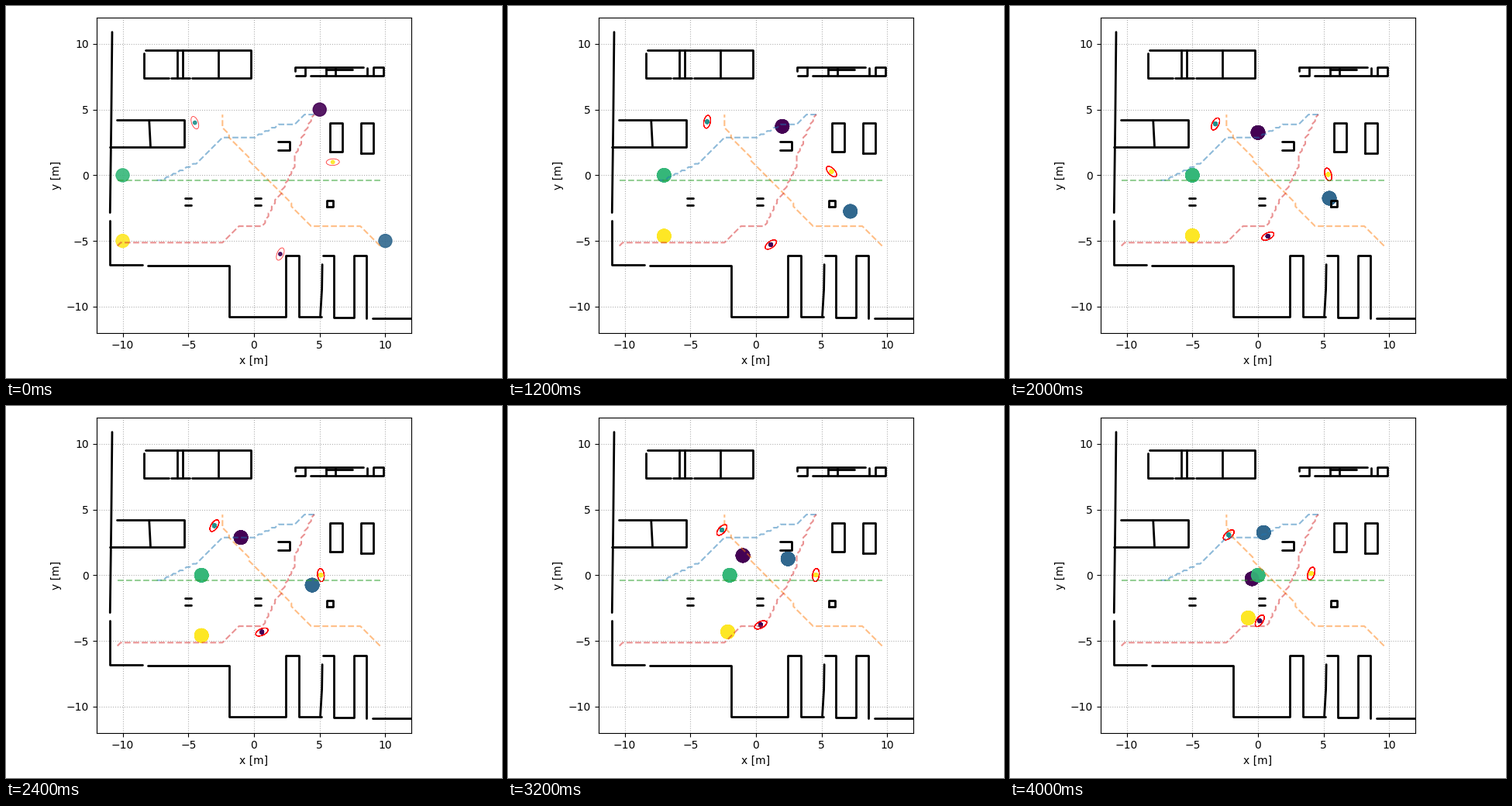
Animation of 640x480 px, one loop 4200 ms. Source, as a matplotlib script:

```python
import matplotlib.pyplot as plt
import numpy as np
from matplotlib.animation import FuncAnimation
from matplotlib.patches import Ellipse

FRAMES = 21
INTERVAL = 200
CELL = 0.25                       # planner grid, metres
ORIGIN = np.array([-10.4, -5.38])

# Routes as corner cells of the planner grid
ROUTES = {
    "tab:blue": [(60, 40), (57, 40), (54, 37), (49, 37), (42, 33), (32, 33),
                 (24, 25), (13, 20), (12, 20)],
    "tab:orange": [(80, 0), (74, 6), (59, 6), (34, 33), (32, 37), (32, 40)],
    "tab:green": [(0, 20), (80, 20)],
    "tab:red": [(0, 0), (1, 1), (32, 1), (37, 6), (44, 6), (54, 24), (54, 27),
                (58, 37), (60, 40)],
}

# Robots turn at (step, x, y) and drive straight in between
ROBOTS = [
    [(0, 5, 5), (3, 3.5, 4.08), (10, 0, 3.25), (14, -2, 2.5), (16, -1, 1.5),
     (20, -0.45, -0.27)],
    [(0, 10, -5), (3, 8.5, -3.5), (10, 5.43, -1.75), (20, 0.43, 3.25)],
    [(0, -10, 0), (20, 0, 0)],
    [(0, -10, -5), (3, -8.5, -4.65), (15, -2.5, -4.57), (20, -0.75, -3.25)],
]

# People follow smooth cubics through their positions at these steps
PEOPLE_STEPS = [0, 6, 14, 20]
PEOPLE = [
    [(2, -6), (1.13, -5.28), (0.47, -4.03), (0.13, -3.47)],
    [(-4.5, 4), (-3.72, 4.07), (-2.8, 3.62), (-2.23, 3.07)],
    [(6, 1), (5.75, 0.28), (4.83, 0), (4.05, 0.13)],
]
CURVES = [np.polyfit(PEOPLE_STEPS, points, 3).T for points in PEOPLE]

fig, ax = plt.subplots(figsize=(6.4, 4.8), dpi=100)


def draw(points):
    ax.plot(*np.transpose(points), color="black", lw=2, solid_capstyle="round")


def trace(x, y, *stops):
    """Draw from (x, y), moving to a new x and a new y by turns."""
    points = [(x, y)]
    for i, stop in enumerate(stops):
        x, y = (x, stop) if i % 2 else (stop, y)
        points.append((x, y))
    draw(points)


def box(x0, y0, x1, y1):
    trace(x0, y0, x1, y1, x0, y0)


def posts(xs, low, high):
    for x in xs:
        trace(x, low, x, high)


def draw_map():
    # Outer walls
    draw([(-10.8, 10.9), (-10.87, 4), (-10.96, -2.85)])
    trace(-10.96, -3.45, -10.96, -6.85, -8.5)
    trace(-8.1, -6.88, -1.86, -10.8, 2.4, -6.1, 3.4, -10.8, 5.15)
    draw([(5.2, -6.8), (5.17, -8.7), (5.05, -10.7)])
    trace(5.25, -6.14, 6.1, -10.83, 7.62, -6.13, 8.58, -10.9)
    trace(9, -10.89, 12)
    # Rooms
    trace(-8.28, 9.53, -0.22, 7.37, -4.7)
    trace(-8.35, 9.3, -8.35, 7.38, -6.5)
    trace(-6.3, 7.37, -4.9)
    posts((-5.82, -5.42, -2.72), 7.4, 9.5)
    trace(-10.45, 4.22, -5.33, 2.16, -10.95)
    draw([(-7.98, 4.15), (-7.88, 2.2)])
    # Shelves
    trace(3.13, 7.9, 3.13, 8.22, 8.33)
    trace(3.2, 7.58, 3.87, 8.2)
    trace(4.3, 7.55, 9.87, 8.2, 9.1, 7.55)
    trace(5.5, 8.05, 7.5)
    posts((5.5, 6.2, 8.63), 7.55, 8.15)
    # Obstacles
    box(5.76, 1.8, 6.72, 4)
    box(8.15, 1.7, 9.08, 3.97)
    box(5.55, -2.4, 6, -1.9)
    trace(1.8, 2.53, 2.72, 1.92, 1.8)
    for x in (-5.25, 0.08):
        for y in (-1.76, -2.3):
            trace(x, y, x + 0.47)


def grid_walk(corners):
    """Cell by cell path between corners, in metres."""
    cells = []
    for a, b in zip(np.array(corners), np.array(corners[1:])):
        cells.extend(np.round(np.linspace(a, b, abs(b - a).max() + 1)))
    return ORIGIN + CELL * np.array(cells)


def robot_position(track, step):
    steps, x, y = np.transpose(track)
    return np.interp(step, steps, x), np.interp(step, steps, y)


def person_pose(curve, step):
    """Position, and the angle across the walking direction."""
    x, y = (np.polyval(c, step) for c in curve)
    dx, dy = (np.polyval(np.polyder(c), step) for c in curve)
    return x, y, np.degrees(np.arctan2(dy, dx)) + 90


def make_layer():
    def dots(count, size):
        return ax.scatter(np.zeros(count), np.zeros(count), s=size,
                          c=np.arange(count), cmap="viridis", alpha=0.9)

    robots, people = dots(len(ROBOTS), 150), dots(len(PEOPLE), 10)
    rings = [ax.add_patch(Ellipse((0, 0), 1, 0.5, fill=False, ec="red",
                                  lw=0.6, alpha=0.8)) for _ in PEOPLE]
    return robots, people, rings


ax.set(xlim=(-12, 12), ylim=(-12, 12), aspect="equal",
       xlabel="x [m]", ylabel="y [m]")
ax.set_xticks(range(-10, 11, 5))
ax.set_yticks(range(-10, 11, 5))
ax.grid(linestyle=":")
ax.set_axisbelow(True)
fig.tight_layout()

draw_map()
for color, corners in ROUTES.items():
    ax.plot(*grid_walk(corners).T, "--", color=color, alpha=0.5)

# Translucent layers pile up, one more per step
layers = [make_layer() for _ in range(FRAMES)]


def update(step):
    robot_xy = [robot_position(track, step) for track in ROBOTS]
    poses = [person_pose(curve, step) for curve in CURVES]
    for i, (robots, people, rings) in enumerate(layers):
        for artist in (robots, people, *rings):
            artist.set_visible(i <= step)
        robots.set_offsets(robot_xy)
        people.set_offsets([pose[:2] for pose in poses])
        for ring, (x, y, angle) in zip(rings, poses):
            ring.set_center((x, y))
            ring.set_angle(angle)
    return []


anim = FuncAnimation(fig, update, frames=FRAMES, interval=INTERVAL,
                     repeat=True, repeat_delay=0)
plt.show()
```
